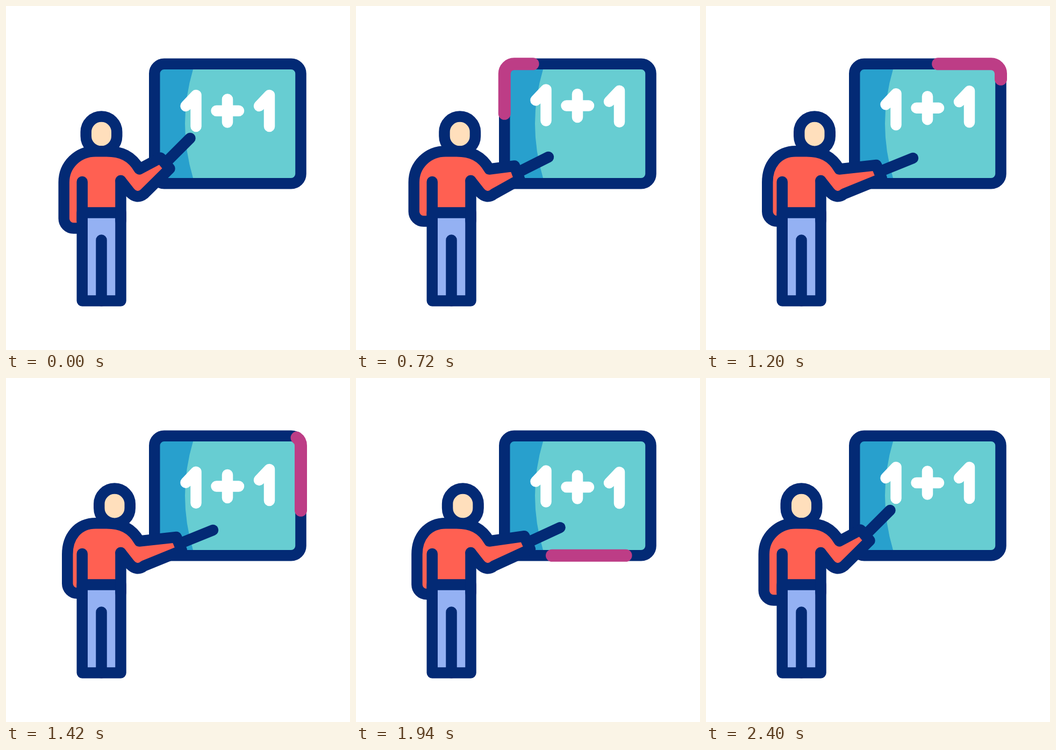
An HTML page with a canvas that plays this animation: 640x640 px, repeating every 2.62 s.

```html
<!DOCTYPE html>
<html lang="en">
<head>
<meta charset="utf-8">
<title>Lesson</title>
<style>
html, body { margin: 0; width: 100%; height: 100%; overflow: hidden; background: #fff; }
canvas { display: block; width: 640px; height: 640px; }
</style>
</head>
<body>
<canvas id="stage" width="640" height="640"></canvas>
<script>
const ctx = document.getElementById('stage').getContext('2d');
const LOOP = 2620;
const LINE = 20.5;
const NAVY = '#032a75', TEAL = '#67cdd2', BLUE = '#28a0cd', RED = '#ff6052';
const SKIN = '#ffdfbc', DENIM = '#94b1f3', PINK = '#bd3d86', WHITE = '#fff';

// Cuff is the wrist line from top to bottom, tip is the end of the pointer.
const RAISED = { head: 177.5, side: 107.75, cuffY: 413.5, cuff: [287.5, 282.5, 304.5, 302.5], tip: [342.5, 246] };
const LOWERED = { head: 193.2, side: 107.75, cuffY: 400.5, cuff: [295, 297.5, 304.5, 323], tip: [358, 281] };
const REACHED = { head: 202, side: 114.25, cuffY: 400.5, cuff: [317, 296, 327, 321], tip: [385, 283] };

const clamp = (v, lo, hi) => Math.min(hi, Math.max(lo, v));
const ease = (t, from, to) => (1 - Math.cos(Math.PI * clamp((t - from) / (to - from), 0, 1))) / 2;
const mix = (a, b, k) => Array.isArray(a) ? a.map((v, i) => mix(v, b[i], k)) : a + (b - a) * k;

function blend(a, b, k) {
  const pose = {};
  for (const key in a) pose[key] = mix(a[key], b[key], k);
  return pose;
}

function poseAt(t) {
  if (t < 800) return blend(RAISED, LOWERED, ease(t, 200, 600));
  if (t < 1800) return blend(LOWERED, REACHED, ease(t, 800, 1200));
  return blend(REACHED, RAISED, ease(t, 1800, 2400));
}

function bob(t, delay) {
  const s = t - delay;
  return 12.5 * (-ease(s, 200, 900) + 2 * ease(s, 900, 1600) - ease(s, 1600, 2300));
}

function stroke(path, color = NAVY, width = LINE) {
  ctx.strokeStyle = color;
  ctx.lineWidth = width;
  ctx.stroke(path);
}

function fill(path, color) {
  ctx.fillStyle = color;
  ctx.fill(path);
}

function box(x, y, w, h, r) {
  const path = new Path2D();
  path.roundRect(x, y, w, h, r);
  return path;
}

const frame = box(276.25, 107.75, 272.25, 222.5, 18);
const shade = new Path2D('M276 118H348Q318 219 348 320H276Z');
const track = new Path2D('M276.25 312.25V125.75A18 18 0 0 1 294.25 107.75H530.5' +
  'A18 18 0 0 1 548.5 125.75V312.25A18 18 0 0 1 530.5 330.25H294.25A18 18 0 0 1 276.25 312.25');
const TRACK_LENGTH = 958;

const one = new Path2D('M334.5 186L353.5 166V224');
const plus = new Path2D('M391.5 195H433M412 173.5V216.5');
const trousers = new Path2D('M141.75 384.5H213.5V548.5H141.75Z');
const seams = new Path2D('M141.75 327V400M213.5 325V400M177.5 435.5V548.5');

function drawBoard(t) {
  fill(frame, TEAL);
  ctx.save();
  ctx.clip(frame);
  fill(shade, BLUE);
  ctx.restore();
  stroke(frame);

  const front = clamp((t - 222) * 0.5, 0, TRACK_LENGTH);
  const tail = clamp((t - 497) * 0.5, 0, TRACK_LENGTH);
  if (front > 0 && tail < TRACK_LENGTH && t < 2400) {
    ctx.setLineDash([Math.max(front - tail, 0.1), 2000]);
    ctx.lineDashOffset = -tail;
    stroke(track, PINK, 23);
    ctx.setLineDash([]);
  }

  drawSign(one, 0, bob(t, 0));
  drawSign(plus, 0, bob(t, 50));
  drawSign(one, 136.5, bob(t, 100));
}

function drawSign(path, dx, dy) {
  ctx.save();
  ctx.translate(dx, dy);
  stroke(path, WHITE);
  ctx.restore();
}

function drawTeacher({ head, side, cuffY, cuff, tip }) {
  const face = box(head - 28.75, 205.5, 57.5, 65.25, 28.75);
  fill(face, SKIN);
  stroke(face);

  const [x1, y1, x2, y2] = cuff;
  const pointer = new Path2D();
  pointer.moveTo((x1 + x2) / 2, (y1 + y2) / 2);
  pointer.lineTo(...tip);
  stroke(pointer);

  const torso = new Path2D();
  torso.moveTo(141.75, cuffY);
  torso.lineTo(side + 18, cuffY);
  torso.arcTo(side, cuffY, side, cuffY - 18, 18);
  torso.lineTo(side, 328);
  torso.bezierCurveTo(side, 296, 133, 270.25, 167, 270.25);
  torso.lineTo(187, 270.25);
  torso.bezierCurveTo(214, 270.25, 234, 279, 248, 303.5);
  torso.lineTo(x1, y1);
  torso.lineTo(x2, y2);
  torso.lineTo(257, 349.5);
  torso.quadraticCurveTo(243, 360.5, 230, 346);
  torso.lineTo(213.5, 325);
  const shirt = new Path2D(torso);
  shirt.lineTo(213.5, 384.5);
  shirt.lineTo(141.75, 384.5);
  fill(shirt, RED);
  stroke(torso);

  fill(trousers, DENIM);
  stroke(trousers);
  stroke(seams);
}

function draw(t) {
  ctx.fillStyle = WHITE;
  ctx.fillRect(0, 0, 640, 640);
  ctx.lineCap = ctx.lineJoin = 'round';
  drawBoard(t);
  drawTeacher(poseAt(t));
}

const start = performance.now();
function tick() {
  draw((performance.now() - start) % LOOP);
  requestAnimationFrame(tick);
}
tick();
</script>
</body>
</html>
```
